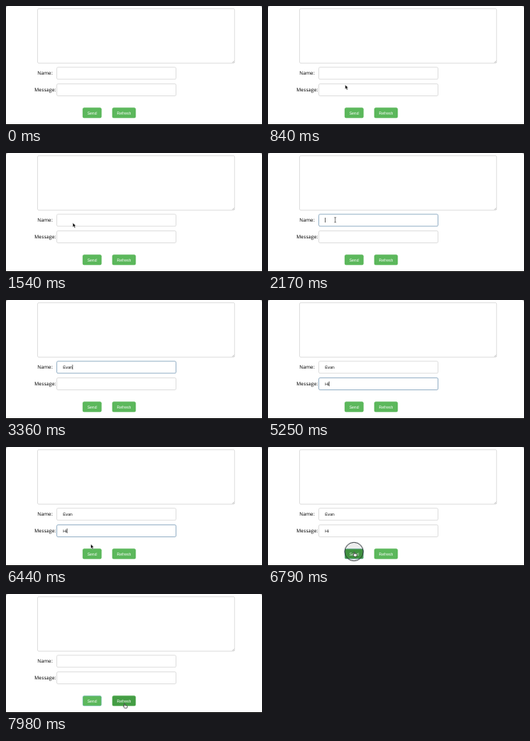
An HTML page for the animation above (8 s loop, 320 by 149 pixels).

```html
<!DOCTYPE html>
<html lang="en">
<head>
<meta charset="utf-8">
<title>Message form</title>
<style>
html, body { margin: 0; width: 100%; height: 100%; overflow: hidden; background: #fff; }
svg { display: block; width: 100%; height: 100%; }
text { font: 5.1px "Liberation Sans", Arial, sans-serif; text-rendering: geometricPrecision; white-space: pre; }
.label { font: 6.15px "Open Sans", sans-serif; }
.box { fill: #fff; stroke: #d3d3d3; stroke-width: .7; }
.btn { fill: #5cb85c; stroke: #4cae4c; stroke-width: .5; }
.cap { fill: #fff; text-anchor: middle; }
.caret { stroke: #111; stroke-width: .6; }
</style>
</head>
<body>
<svg viewBox="0 0 320 149">
  <path d="M0 0h2L0 2zM320 0h-2l2 2z" fill="#bbb"/>
  <rect class="box" x="39.5" y="3.4" width="246.2" height="68.2" rx="1.6"/>
  <path d="M282.8 71L285.2 68.6M284.3 71l.9-.9" stroke="#999" stroke-width=".5"/>
  <text class="label" x="39.3" y="86">Name:</text>
  <text class="label" x="35.5" y="107">Message:</text>
  <g id="name">
    <rect class="box" x="63.5" y="76.7" width="149" height="15" rx="1.6"/>
    <text x="71.2" y="85.9"></text>
    <path class="caret" d="M0 81v6"/>
  </g>
  <g id="msg">
    <rect class="box" x="63.5" y="97.5" width="149" height="15" rx="1.6"/>
    <text x="71.2" y="106.8"></text>
    <path class="caret" d="M0 102v6"/>
  </g>
  <rect id="send" class="btn" x="96" y="127.6" width="23.2" height="12.4" rx="1.6"/>
  <text class="cap" x="107.6" y="135.6">Send</text>
  <rect id="refresh" class="btn" x="133" y="127.6" width="29" height="12.4" rx="1.6"/>
  <text class="cap" x="147.5" y="135.6">Refresh</text>
  <rect y="148" width="320" height="1"/>
  <circle id="ring" fill="#000" fill-opacity=".07" stroke="#2d3338" stroke-width=".9"/>
  <g id="pointer">
    <path id="arrow" d="M0 0v5.3l1.2-1.1 1 2.1 1-.5-1-2h1.7z" fill="#000" stroke="#fff" stroke-width=".4"/>
    <path id="beam" d="M-1.2-3.2q1.2 0 1.2.7v5q0 .7-1.2.7M1.2-3.2q-1.2 0-1.2.7M1.2 3.2q-1.2 0-1.2-.7" fill="none" stroke="#222" stroke-width=".6"/>
    <path id="hand" d="M-.5.4Q0-.3.5.4V2.2L3 2.8Q3.6 3 3.4 4L2.8 6H.1L-1.6 3.6Q-1.3 2.8-.5 3.5z" fill="#fff" stroke="#111" stroke-width=".6"/>
  </g>
</svg>
<script>
const LOOP = 8000, STEP = 70;
const $ = id => document.getElementById(id);
const show = (el, on) => el.style.display = on ? "" : "none";
const within = (t, a, b) => t >= a && t < b;

// time, x, y of the pointer
const path = [
  [140, 131.5, 135.5], [210, 122.5, 131.5], [350, 122.5, 131.5],
  [630, 98.6, 100.6], [770, 98.6, 100.6], [1260, 83.5, 87.5],
  [1750, 83.5, 87.5], [2030, 84, 83.6], [5950, 84.5, 88.5],
  [6440, 106, 121.7], [6720, 107.8, 131.3], [7490, 107.8, 131.3],
  [7980, 148.2, 137]
];

function pointerAt(t) {
  const i = path.findIndex(p => p[0] > t);
  if (i < 0) return path[path.length - 1].slice(1);
  const a = path[Math.max(i - 1, 0)], b = path[i];
  const k = Math.max(0, (t - a[0]) / (b[0] - a[0]));
  return [a[1] + (b[1] - a[1]) * k, a[2] + (b[2] - a[2]) * k];
}

// keys: times at which each letter of the word appears
function field(id, t, word, keys, from, to, caretOn) {
  const [box, label, caret] = $(id).children;
  const typed = t < 7210 ? word.slice(0, keys.filter(k => t >= k).length) : "";
  const focused = within(t, from, to);
  if (label.textContent !== typed) label.textContent = typed;
  box.style.stroke = focused ? (t < from + STEP ? "#9bb7cc" : "#7499b5") : "";
  const width = typed ? label.getComputedTextLength() : 0;
  caret.setAttribute("transform", `translate(${71.5 + width})`);
  show(caret, focused && caretOn);
}

function draw(now) {
  const t = Math.floor(now % LOOP / STEP) * STEP;
  const [x, y] = pointerAt(t);

  field("name", t, "Evan", [2940, 3010, 3290, 3360], 2100, 3780, !within(t, 2590, 2940));
  field("msg", t, "Hi", [5110, 5250], 3780, 6790,
    !within(t, 4340, 4830) && !within(t, 5740, 6230) && t < 6720);

  const overSend = y > 127 && within(x, 96, 119.2) && t > 5950;
  const overRefresh = y > 127 && x > 133 && t > 5950;
  $("send").style.fill = overSend ? "#449d44" : "";
  $("send").style.stroke = t >= 6790 ? "#6fb3bd" : "";
  $("refresh").style.fill = overRefresh ? "#449d44" : "";

  const beam = within(t, 1890, 2940), hand = overSend || overRefresh;
  show($("pointer"), within(t, 140, 2940) || t >= 5950);
  show($("beam"), beam);
  show($("hand"), hand);
  show($("arrow"), !beam && !hand);
  $("pointer").setAttribute("transform", `translate(${x} ${y})`);

  const ring = $("ring"), late = t > 6000;
  show(ring, within(t, 1400, 1540) || within(t, 6790, 7000));
  ring.setAttribute("cx", late ? 107.5 : 83.5);
  ring.setAttribute("cy", late ? 131 : 87.5);
  ring.setAttribute("r", late ? 11.6 : 7.8);
}

const start = performance.now();
function tick() {
  draw(performance.now() - start);
  requestAnimationFrame(tick);
}
tick();
</script>
</body>
</html>
```
